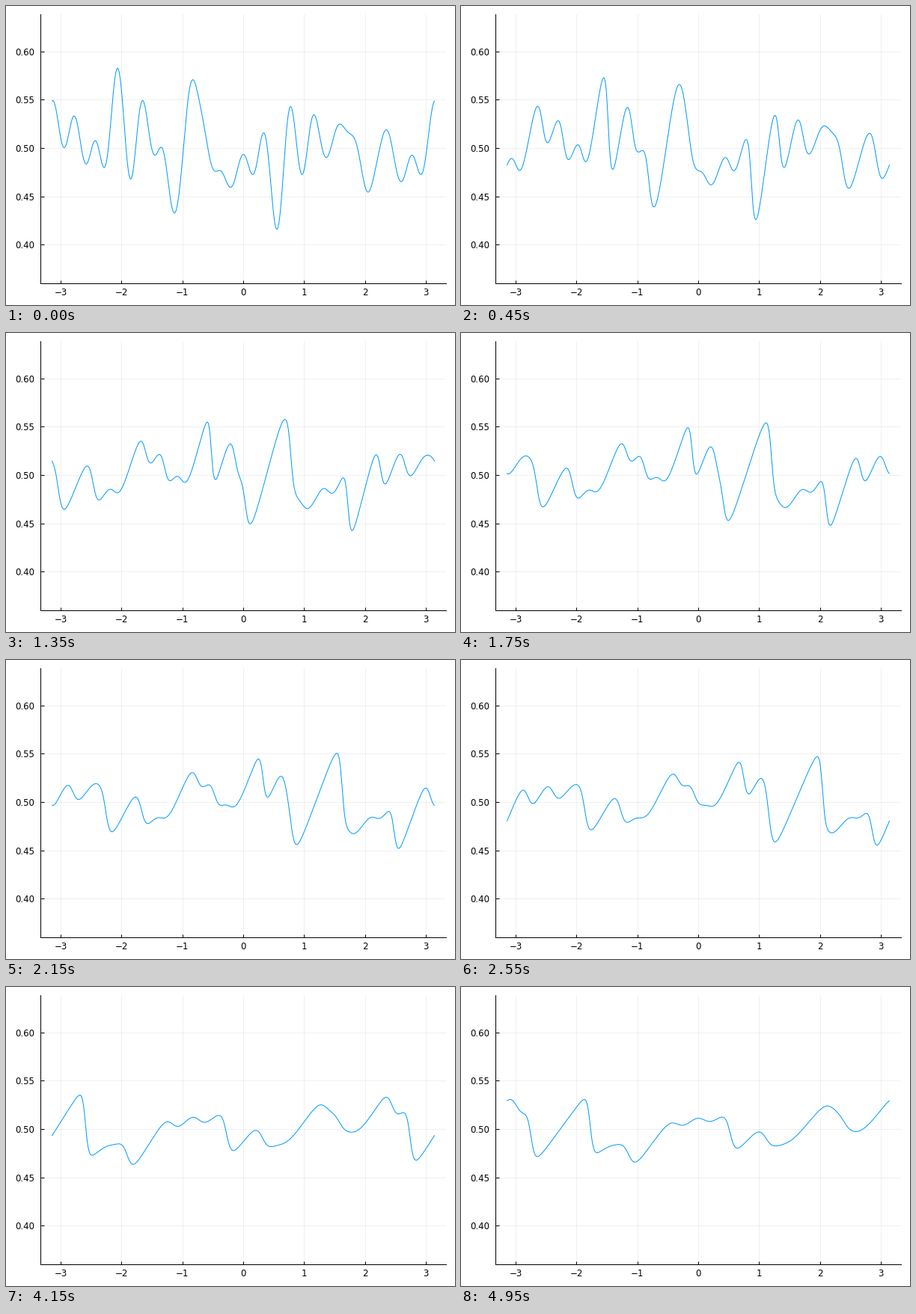
A matplotlib script for the animation above (5 s loop, 600 by 400 pixels).

```python
import numpy as np
import matplotlib.pyplot as plt
from matplotlib.animation import FuncAnimation

# Viscous Burgers flow, u_t + u u_x = nu u_xx, on a periodic interval.
W, H, DPI = 600, 400, 100
FRAMES, INTERVAL = 100, 50
T_END, SUBSTEPS = 10.0, 10
N, NU, MEAN = 512, 0.001, 0.5
PX = 72 / DPI

LEFT, RIGHT, TOP, BOTTOM = 46.2, 587.8, 11.35, 371.25
X_MAX = 1.06 * np.pi
Y_SCALE, Y_MID = 1294.0, 190.05

# Key points of the starting wave: x, height above the mean in thousandths.
KEYS = [
    (-3.128, 49.2), (-2.944, 0.4), (-2.778, 33.2), (-2.581, -16.6),
    (-2.434, 7.7), (-2.280, -20.1), (-2.065, 82.7), (-1.849, -32.1),
    (-1.659, 49.1), (-1.456, -7.3), (-1.345, 0.8), (-1.130, -67.2),
    (-0.829, 70.7), (-0.460, -24.0), (-0.386, -23.2), (-0.202, -40.6),
    (0.001, -6.6), (0.161, -27.4), (0.339, 15.8), (0.555, -84.1),
    (0.776, 42.9), (0.967, -27.4), (1.157, 34.4), (1.360, -9.7),
    (1.581, 24.7), (1.815, 11.2), (2.049, -45.6), (2.350, 18.9),
    (2.596, -34.8), (2.774, -7.3), (2.922, -27.4),
]


def fourier_rows(x, k, slope=False):
    phase = np.outer(x, k)
    if slope:
        return np.hstack([-k * np.sin(phase), k * np.cos(phase)])
    return np.hstack([np.cos(phase), np.sin(phase)])


def starting_wave(x):
    """Smooth Fourier series through the keys, level at peaks and troughs,
    and close to half height midway between neighbours."""
    xk, uk = np.array(KEYS).T
    uk = uk / 1000
    x_next = np.append(xk[1:], xk[0] + 2 * np.pi)
    rise = np.roll(uk, -1) - uk
    turns = xk[rise * np.roll(rise, 1) < 0]

    noise, slope_noise = 0.0004, 0.06
    mid_noise = noise + 0.03 * np.abs(rise)
    k = np.arange(32)
    spread = np.tile(0.01 * np.exp(-(k / 25) ** 6), 2)
    rows = np.vstack([
        fourier_rows(xk, k) / noise,
        fourier_rows((xk + x_next) / 2, k) / mid_noise[:, None],
        fourier_rows(turns, k, slope=True) / slope_noise,
    ]) * spread
    goal = np.concatenate([
        uk / noise, (uk + rise / 2) / mid_noise,
        np.zeros(len(turns) + 2 * len(k)),
    ])
    rows = np.vstack([rows, np.eye(2 * len(k))])
    coef = np.linalg.lstsq(rows, goal, rcond=None)[0] * spread
    return MEAN + fourier_rows(x, k) @ coef


def evolve(u):
    """Spectral solution at every frame, RK4 with an integrating factor."""
    k = np.arange(N // 2 + 1)
    dt = T_END / (FRAMES - 1) / SUBSTEPS
    half = np.exp(-NU * k ** 2 * dt / 2)
    full = half ** 2
    keep = k < N / 3

    def advect(v):
        return -0.5j * k * keep * np.fft.rfft(np.fft.irfft(v, N) ** 2)

    v = np.fft.rfft(u)
    states = [u]
    for _ in range(FRAMES - 1):
        for _ in range(SUBSTEPS):
            a = advect(v)
            b = advect(half * (v + dt / 2 * a))
            c = advect(half * v + dt / 2 * b)
            d = advect(full * v + dt * half * c)
            v = full * v + dt / 6 * (full * a + 2 * half * (b + c) + d)
        states.append(np.fft.irfft(v, N))
    return np.array(states)


x = -np.pi + 2 * np.pi * np.arange(N + 1) / N
waves = evolve(starting_wave(x[:-1]))
waves = np.hstack([waves, waves[:, :1]])

plt.rcParams["font.family"] = "DejaVu Sans"
fig = plt.figure(figsize=(W / DPI, H / DPI), dpi=DPI, facecolor="white")
ax = fig.add_axes([LEFT / W, 1 - BOTTOM / H, (RIGHT - LEFT) / W, (BOTTOM - TOP) / H])
ax.set_xlim(-X_MAX, X_MAX)
ax.set_ylim(MEAN + (Y_MID - BOTTOM) / Y_SCALE, MEAN + (Y_MID - TOP) / Y_SCALE)

ax.set_xticks(range(-3, 4))
ax.set_yticks(np.arange(8, 13) / 20)
ax.yaxis.set_major_formatter("{x:.2f}")
ax.tick_params(direction="in", length=4.5 * PX, width=PX, labelsize=11.7 * PX)
ax.tick_params(axis="x", pad=6 * PX)
ax.tick_params(axis="y", pad=8 * PX)
ax.grid(color="black", alpha=0.06, linewidth=PX)
ax.set_axisbelow(True)
for side in ("top", "right"):
    ax.spines[side].set_visible(False)
for side in ("left", "bottom"):
    ax.spines[side].set_linewidth(PX)

line, = ax.plot(x, waves[0], color="#009AFA", linewidth=PX)


def draw(frame):
    line.set_ydata(waves[frame])
    return line,


anim = FuncAnimation(fig, draw, frames=FRAMES, interval=INTERVAL,
                     repeat=True, repeat_delay=0, blit=False)
plt.show()
```
